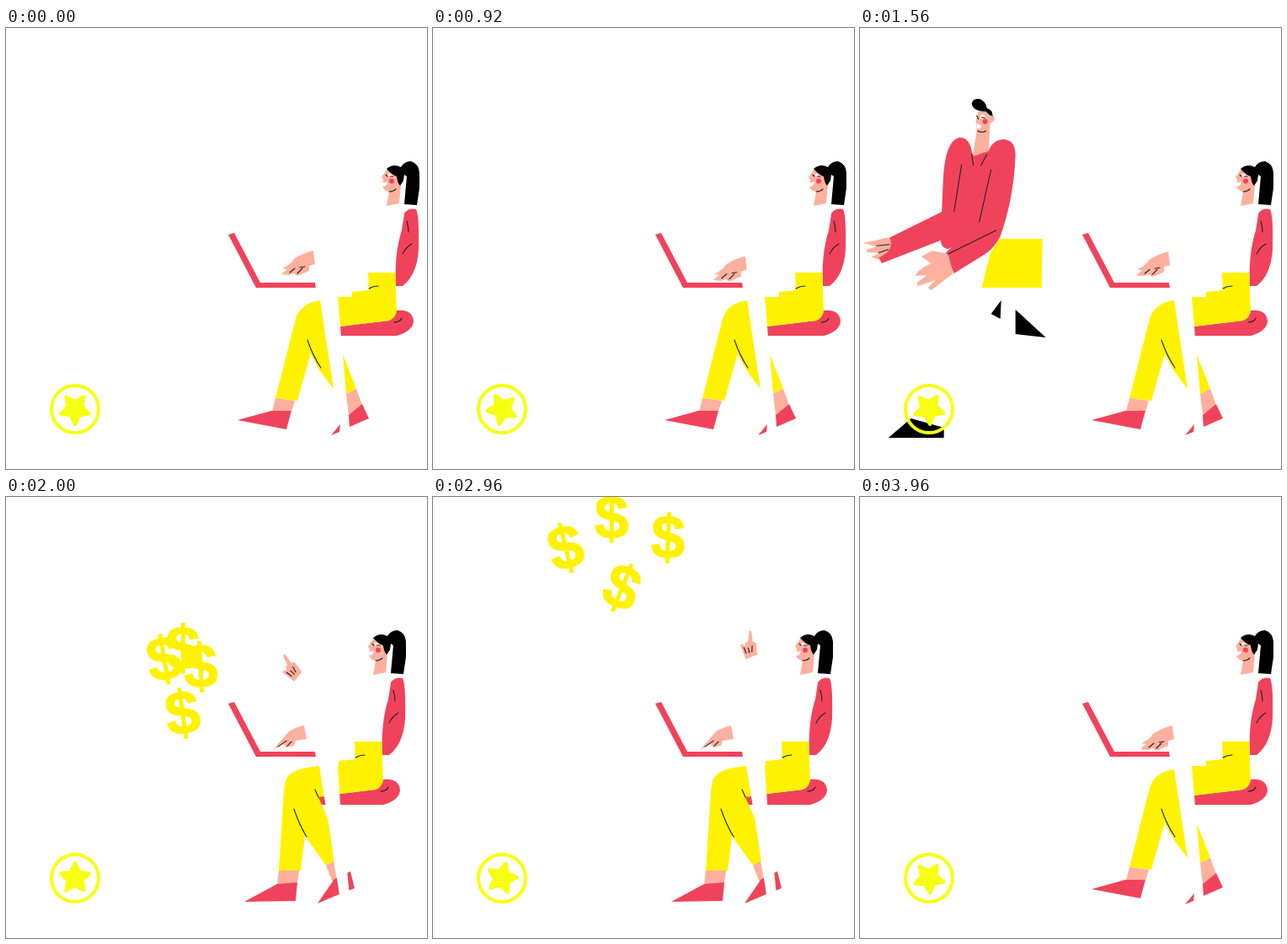
Animation of 500x523 px, one loop 4000 ms. Source, as an HTML page:

```html
<!DOCTYPE html>
<html lang="en">
<head>
<meta charset="utf-8">
<title>Office loop</title>
<style>
  html, body { margin: 0; width: 100%; height: 100%; overflow: hidden; background: #fff; }
  svg { display: block; width: 100%; height: 100%; }
  .red { fill: #f0435b; }
  .skin { fill: #ffb09f; }
  .yellow { fill: #fff200; }
  .white { fill: #fff; }
  .line { fill: none; stroke: #222; stroke-width: 1.1; stroke-linecap: round; }
  text { font: bold 73px "Liberation Sans", Arial, sans-serif; text-anchor: middle; fill: #fff200; stroke: #fff200; stroke-width: 1.2; }
</style>
</head>
<body>
<svg viewBox="0 0 500 523">
  <defs>
    <g id="torso">
      <path class="skin" d="M453 167L446 177L448 180L447 187Q448 193 455 194L452 211L467 208L469 186L463 168Z"/>
      <path d="M452 167Q460 160 469 165Q473 158 481 158Q490 161 491 171L491 190L488 210L473 209L476 176L473 174L472 181L468 187Q465 184 464 176Q458 174 452 167Z"/>
      <circle class="red" cx="458" cy="181.500" r="3"/>
      <path class="white" d="M447 183Q450 184 453 182Q453 188 447 188ZM453 174Q456 171 460 176L455 177Z"/>
      <path class="line" d="M451 174L453 176M456 176L460 176M455 194Q460 194 463 191"/>
      <path class="red" d="M473 220Q478 213 487 215Q491 222 490 263Q488 293 471 306L463 306Q461 268 470 240Q472 228 473 220Z"/>
      <path class="line" d="M476 229Q478 236 478 242M471 268Q475 260 482 256"/>
      <path class="red" d="M388 355L455 347Q463 343 464 335Q482 333 484 347Q484 359 464 365L388 365Z"/>
      <path class="line" d="M461 349Q468 349 470 344"/>
      <path class="yellow" d="M430 290L462 290L464 335Q463 344 455 347L388 355L385 319L411 319L411 313L431 311Z"/>
      <path class="line" d="M431 309Q436 306 442 306"/>
    </g>
  </defs>

  <g id="man">
    <path class="skin" d="M172 99L185 98L187 105Q192 103 191 109Q189 113 186 112L184 150L165 153L170 122L169 110Z"/>
    <path d="M164 90Q165 83 173 84Q181 87 182 95Q189 97 189 105L185 103L181 99Q166 99 164 90Z"/>
    <circle class="red" cx="180" cy="111" r="3"/>
    <path class="white" d="M170 113L176 116Q174 121 170 119ZM174 104Q178 100 181 107L175 108Z"/>
    <path class="line" d="M170 104L172 108M176 106L180 107M171 122Q177 125 181 122"/>
    <path class="yellow" d="M176 308L186 267L197 250L248 250L247 308Z"/>
    <g id="arm">
      <path class="skin" d="M37 265Q52 262 62 257L73 256L72 274L64 284L53 282L49 281L58 275L44 276L42 273L54 268Z"/>
      <path class="red" d="M132 216L68 256Q74 264 67 274L58 281L62 287L135 250Z"/>
      <path class="line" d="M54 267L69 264M57 275L68 270"/>
    </g>
    <path class="red" d="M136 262Q127 261 127 250L130 182Q132 134 149 130Q161 129 164 146L166 152L184 146Q189 132 203 132Q216 134 216 151Q214 202 198 247Q190 262 180 268L143 291L133 267L140 260Z"/>
    <path class="skin" d="M104 271L117 264L136 268L142 291L116 311L112 308L121 299L100 306L99 302L111 293L97 294Q99 287 116 279Z"/>
    <path class="line" d="M152 162L143 218M187 168L173 230M164 150L166 163M182 150L175 163M193 240L136 268"/>
    <path d="M187 339L199 323L198 345ZM216 334L252 367L216 363ZM65 486L92 463L131 474L131 486Z"/>
  </g>

  <path class="red" d="M264 245L271 243L302 302L367 302L368 308L297 308Z"/>

  <g id="poseA">
    <use href="#torso"/>
    <path class="white" d="M373 318L394 318L398 366L386 366Z"/>
    <path class="yellow" d="M373 323L389 428Q368 402 362 386L346 442L320 439L344 345Q350 326 373 323ZM400 387L416 428L404 434Z"/>
    <path class="line" d="M358 370Q364 388 374 403"/>
    <path class="skin" d="M320 439L343 442L339 455L316 455ZM404 434L416 428L423 447L407 459Z"/>
    <path class="red" d="M275 465L315 454L339 454L333 476ZM407 459L423 446L431 463L408 473ZM386 483L397 470L396 479Z"/>
    <g id="handA">
      <path class="skin" d="M331 296L338 290L332 289Q342 285 346 278Q356 271 369 268L371 284L364 286L364 292L350 298L346 295L340 297Z"/>
      <path class="line" d="M341 294L347 289M350 295L356 289M353 288L359 287"/>
    </g>
  </g>

  <g id="poseB">
    <use href="#torso" x="-16"/>
    <path class="red" d="M367 355L380 355L380 365L375 365Z"/>
    <path class="yellow" d="M374 319Q340 321 333 334Q331 339 330 350L324 443L350 443L355 402L380 437L390 432L383 383L371 356L397 353L394 319Z"/>
    <path class="line" d="M342 370Q348 388 357 403M367 347L371 356"/>
    <path class="skin" d="M324 443L348 443L346 458L322 460ZM380 437L389 432L393 453L388 457Z"/>
    <path class="red" d="M283 480L322 459L346 457L344 479ZM370 482L390 453L409 444L414 464L396 471Z"/>
    <path class="white" d="M372 319L394 319L397 364L408 472L396 472L382 380Z"/>
    <g id="handB">
      <path class="skin" d="M317 300L336 278Q344 273 354 271L357 287L344 289L342 295L333 297L329 293Z"/>
      <path class="line" d="M323 296L333 289M334 295L339 290"/>
    </g>
    <g id="wag">
      <path class="skin" d="M384 168L386 157Q389 154 389 159L389 169L393 171L393 185L379 189L374 172Q377 169 379 174L381 169Z"/>
      <path class="line" d="M378 175L380 182M383 176L384 182M388 174L387 181"/>
    </g>
  </g>

  <g id="money"></g>

  <circle cx="82" cy="452" r="28" fill="none" stroke="#f7ff12" stroke-width="4"/>
  <path id="star" fill="#f7ff12" stroke="#f7ff12" stroke-width="4" stroke-linejoin="round"/>
</svg>
<script>
const LOOP = 4000;
const POSE_B = [1640, 3600], MAN = [1100, 1640], MONEY = [1720, 3360];
// Each sign: x, y, angle at the three key times
const KEYS = [2000, 2560, 2960];
const SIGNS = [
  [[188, 194, -10], [174, 128, -12], [158, 62, -14]],
  [[210, 181, 0], [211, 91, 0], [212, 26, 0]],
  [[231, 203, -3], [256, 115, -1], [279, 50, 2]],
  [[210, 258, -8], [220, 171, 10], [224, 109, 22]]
];

const $ = id => document.getElementById(id);
const clamp = v => Math.max(0, Math.min(1, v));
const smooth = v => (v = clamp(v), v * v * (3 - 2 * v));
const wave = (t, period, peak = 0) => Math.cos((t - peak) / period * 2 * Math.PI);
const show = (id, on) => $(id).style.display = on ? "" : "none";
const within = (t, [a, b]) => t >= a && t < b;
const move = (id, v) => $(id).setAttribute("transform", v);

const signs = SIGNS.map(() => {
  const el = document.createElementNS("http://www.w3.org/2000/svg", "text");
  el.textContent = "$";
  el.setAttribute("y", 23);
  return $("money").appendChild(el);
});

$("star").setAttribute("d", "M" + Array.from({ length: 10 }, (_, i) => {
  const r = i % 2 ? 9 : 18, a = i * Math.PI / 5;
  return [r * Math.sin(a), -r * Math.cos(a)].map(v => v.toFixed(2));
}).join("L") + "Z");

function drawMoney(t) {
  const i = t < KEYS[1] ? 0 : 1;
  const u = (t - KEYS[i]) / (KEYS[i + 1] - KEYS[i]);
  const size = smooth((t - MONEY[0] + 40) / 160);
  SIGNS.forEach((keys, n) => {
    const [x, y, a] = keys[i].map((v, k) => v + (keys[i + 1][k] - v) * u);
    signs[n].setAttribute("transform", `translate(${x} ${y}) rotate(${a}) scale(${size})`);
  });
}

function draw(t) {
  const b = within(t, POSE_B);
  show("poseA", !b);
  show("poseB", b);
  show("man", within(t, MAN));
  show("money", within(t, MONEY));

  move("star", `translate(82 452) rotate(${36 + t * 0.09})`);

  const tap = 0.5 - wave(t, 377) / 2;
  move("handA", `translate(${-4 + 6 * tap} ${-4 + 7 * tap})`);
  const press = wave(t, 320, 2560);
  move("handB", `translate(${-3 * press} ${-4 * press})`);
  move("wag", `rotate(${26 * wave(t, 1200, 2735) - 15.8} 407 261)`);

  const rise = 9 * (1 - smooth((t - MAN[0]) / 160));
  const step = 37 * smooth((t - 1320) / 320);
  move("man", `translate(${-step} ${rise})`);
  move("arm", `rotate(${6 * smooth((t - 1300) / 300)} 140 235)`);

  drawMoney(t);
}

const start = performance.now();
function frame() {
  draw((performance.now() - start) % LOOP);
  requestAnimationFrame(frame);
}
draw(0);
requestAnimationFrame(frame);
</script>
</body>
</html>
```
